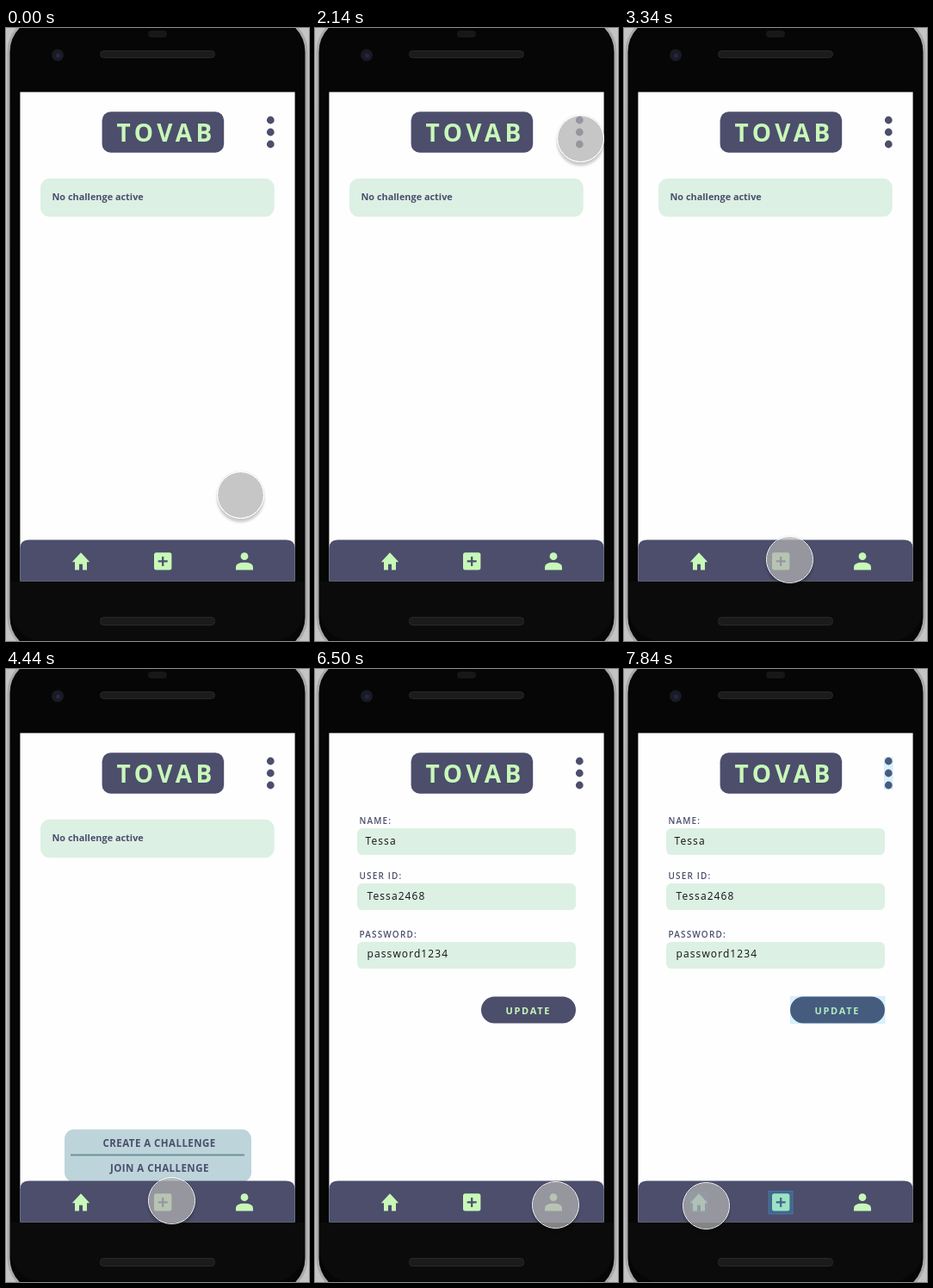
Recreate the animation shown at these times as an HTML page. Size 352x712 px, loop 7990 ms.

```html
<!DOCTYPE html>
<html lang="en">
<head>
<meta charset="utf-8">
<title>Phone prototype</title>
<style>
  html, body { margin: 0; width: 100%; height: 100%; overflow: hidden; background: #c4c4c4; }
  svg { position: absolute; left: 0; top: 0; font-family: "Open Sans", sans-serif; }
  #cursor {
    position: absolute; left: 0; top: 0; width: 55px; height: 55px;
    box-sizing: border-box; border: 1px solid #fff; border-radius: 50%;
    background: rgba(177, 177, 177, .73) padding-box;
    box-shadow: 0 0 1px rgba(0, 0, 0, .35), 0 4px 3px rgba(0, 0, 0, .2);
  }
  .navy { fill: #4c4e6c; }
  .lime { fill: #c8f8b8; }
  .mint { fill: #dcf0e4; }
  .bold { font-weight: 700; }
  .label { font-weight: 600; font-size: 10px; letter-spacing: 1.15px; }
  .value { font-size: 12px; letter-spacing: 1.1px; fill: #111; }
  .choice { font-weight: 700; font-size: 11.5px; letter-spacing: .45px; }
  .hint rect { fill: #28aae6; fill-opacity: .3; stroke: #4cc0f0; stroke-opacity: .5; stroke-width: .7; }
  #popup, #profile, #hints { opacity: 0; }
</style>
</head>
<body>
<svg width="352" height="712" viewBox="0 0 352 712">
  <!-- phone body -->
  <rect x="3" y="-14" width="346" height="740" rx="42" fill="#060606" stroke="#a9a9a9" stroke-width="3"/>
  <rect x="5" y="643" width="342" height="69" fill="#0b0b0b" clip-path="inset(0 round 0 0 38px 38px)"/>
  <g fill="#1b1b1b" stroke="#292929">
    <rect x="109.5" y="26.5" width="133" height="8" rx="4"/>
    <rect x="109.5" y="684.5" width="133" height="9" rx="4"/>
  </g>
  <rect x="165" y="3" width="22" height="8" rx="4" fill="#171717"/>
  <circle cx="60" cy="31.5" r="7" fill="#1a1a22"/>
  <circle cx="60.5" cy="32" r="2.6" fill="#23264e"/>

  <!-- screen -->
  <rect x="16.4" y="74.4" width="319.2" height="568" fill="#fefefe"/>
  <rect class="navy" x="111.6" y="97.2" width="141.6" height="47.6" rx="10"/>
  <text class="lime bold" x="128.5" y="132" font-size="28" letter-spacing="4.5">TOVAB</text>
  <path d="M307.3 107v28.1" stroke="#4c4e6c" stroke-width="8.8" stroke-linecap="round" stroke-dasharray="0 14"/>

  <g id="home">
    <rect class="mint" x="40" y="174.7" width="271.7" height="44.6" rx="11"/>
    <text class="navy bold" x="53.5" y="200" font-size="10.9">No challenge active</text>
  </g>

  <g id="profile">
    <g class="mint">
      <rect x="49" y="185" width="254" height="31" rx="6"/>
      <rect x="49" y="249" width="254" height="31" rx="6"/>
      <rect x="49" y="317" width="254" height="31" rx="6"/>
    </g>
    <text class="navy label" x="51.5" y="180">NAME:</text>
    <text class="navy label" x="51.5" y="244">USER ID:</text>
    <text class="navy label" x="51.5" y="311.5">PASSWORD:</text>
    <text class="value" x="58.5" y="204">Tessa</text>
    <text class="value" x="60.5" y="268">Tessa2468</text>
    <text class="value" x="60.5" y="335">password1234</text>
    <rect class="navy" x="193" y="380.5" width="110" height="31" rx="15.5"/>
    <text class="lime bold" x="221.5" y="401" font-size="11" letter-spacing="1.7">UPDATE</text>
  </g>

  <g id="popup">
    <rect x="68" y="534.7" width="217" height="61" rx="11" fill="#bdd4da"/>
    <path d="M75 564.5H277" stroke="#6f919c" stroke-width="2"/>
    <text class="navy choice" x="112.5" y="555">CREATE A CHALLENGE</text>
    <text class="navy choice" x="121" y="584">JOIN A CHALLENGE</text>
  </g>

  <!-- navigation bar -->
  <path class="navy" d="M16.4 642.4V604.5q0-10 10-10H325.6q10 0 10 10V642.4z"/>
  <path class="lime" d="M87 609.3L76.8 620.3h3.2v9.3h5v-6.8h4v6.8h5v-9.3h3.2z"/>
  <rect class="lime" x="172" y="609.2" width="20.4" height="20.4" rx="2.5"/>
  <path d="M182.2 613.9v11M176.7 619.4h11" stroke="#4c4e6c" stroke-width="2.2"/>
  <circle class="lime" cx="277" cy="613.7" r="4.4"/>
  <path class="lime" d="M267 629.5V626.3q0-5.5 10-5.5t10 5.5V629.5z"/>

  <g id="hints" class="hint">
    <rect x="302.5" y="103" width="9.5" height="36.5"/>
    <rect x="193.5" y="380.5" width="109.5" height="31"/>
    <rect x="168" y="606.5" width="28" height="26.5"/>
    <rect x="168" y="606.5" width="28" height="26.5"/>
    <rect x="77" y="608" width="20" height="23"/>
  </g>
</svg>
<div id="cursor"></div>

<script>
  const LOOP = 7990;
  const RADIUS = 27.5;

  function loop(id, frames) {
    document.getElementById(id).animate(frames, { duration: LOOP, iterations: Infinity });
  }

  // Shows an element from one time to another, with hard cuts.
  function show(id, from, to) {
    const at = (time, opacity) => ({ offset: time / LOOP, opacity, easing: "steps(1, end)" });
    loop(id, [at(0, from > 0 ? 0 : 1), at(from, 1), at(to, to < LOOP ? 0 : 1), at(LOOP, 0)]);
  }

  // Rests at each point, then glides to the next one between two times.
  function glide(id, start, moves) {
    const at = (time, [x, y]) => ({
      offset: time / LOOP,
      easing: "ease-in-out",
      transform: `translate(${x - RADIUS}px, ${y - RADIUS}px)`
    });
    const frames = [at(0, start)];
    let rest = start;
    for (const { from, to, point } of moves) {
      frames.push(at(from, rest), at(to, point));
      rest = point;
    }
    loop(id, [...frames, at(LOOP, rest)]);
  }

  show("home", 0, 6500);
  show("profile", 6500, LOOP);
  show("popup", 3790, 4590);

  loop("hints", [
    { offset: 0, opacity: 0 },
    { offset: 7100 / LOOP, opacity: 0 },
    { offset: 7300 / LOOP, opacity: 1 },
    { offset: 1, opacity: .4 }
  ]);

  const idle = [272.5, 542.5];
  const menu = [308.5, 128.5];
  const aboveHome = [110.5, 572.5];
  const add = [192.5, 617.5];
  const besideAdd = [135.5, 617.5];
  const besidePerson = [248.5, 629.5];
  const person = [279.5, 622.5];
  const home = [95.5, 623.5];

  glide("cursor", idle, [
    { from: 320, to: 900, point: menu },
    { from: 2440, to: 2780, point: aboveHome },
    { from: 2820, to: 3340, point: add },
    { from: 4480, to: 5010, point: besideAdd },
    { from: 5010, to: 5160, point: besidePerson },
    { from: 5200, to: 5820, point: person },
    { from: 7350, to: 7840, point: home }
  ]);
</script>
</body>
</html>
```
